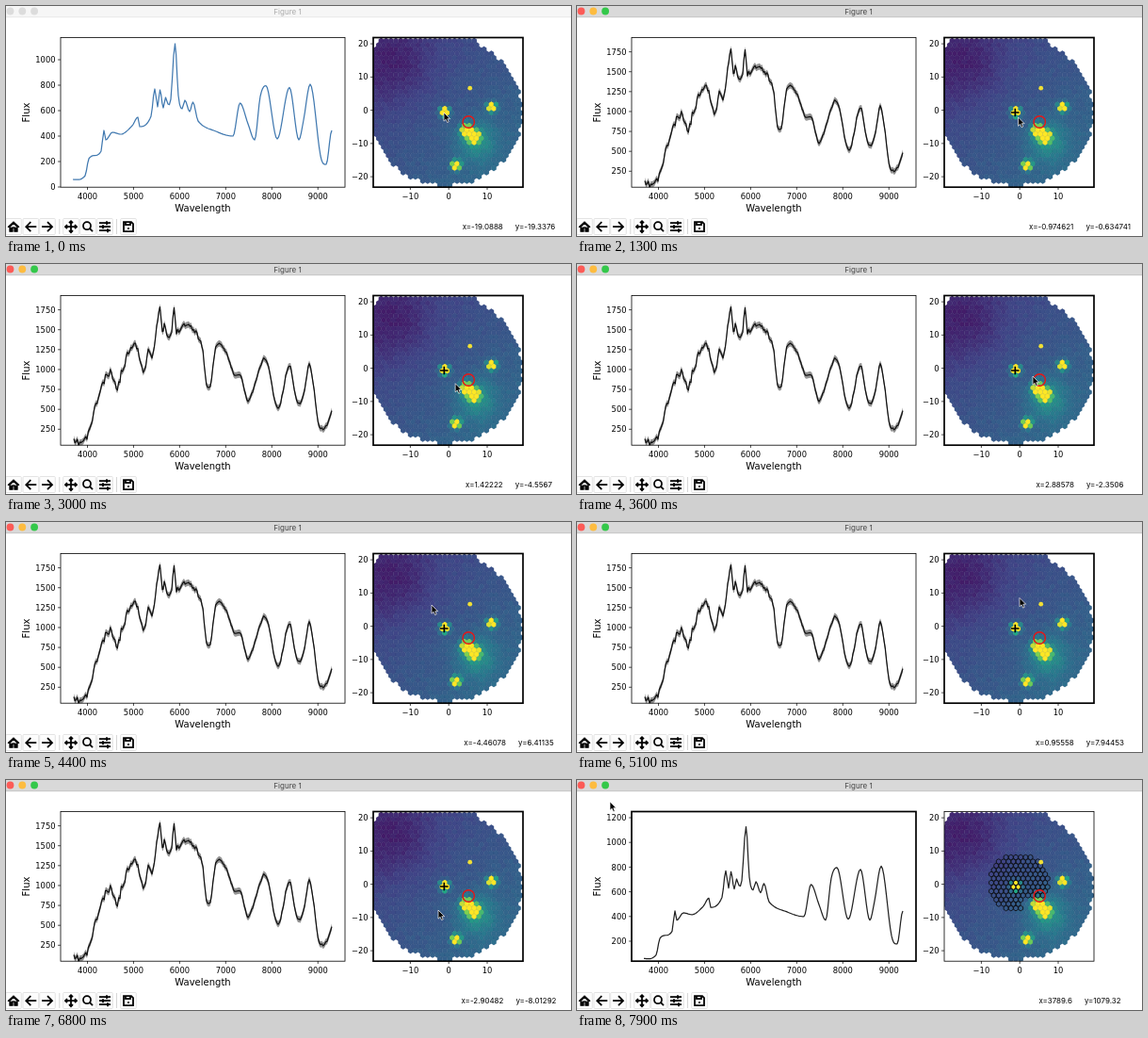
An HTML page that plays this animation: 600 by 244 pixels, repeating every 8 s.

```html
<!DOCTYPE html>
<html lang="en">
<head>
<meta charset="utf-8">
<title>Spectrum viewer</title>
<style>
html, body { margin: 0; width: 100%; height: 100%; overflow: hidden; background: #fff; }
svg { display: block; width: 600px; height: 244px; }
.tick { font: 8.33px "DejaVu Sans", sans-serif; }
.label { font: 10px "DejaVu Sans", sans-serif; text-anchor: middle; }
.ui { font: 8px Inter, sans-serif; text-anchor: middle; }
</style>
</head>
<body>
<svg id="stage" viewBox="0 0 600 244"></svg>
<script>
const stage = document.getElementById('stage');
const LOOP = 8000, STEP = 100;
const ACTIVATE = 500, PICK = 1000, GROUP = 7000, LEAVE = 7400;

function el(tag, attrs = {}, parent = stage, text) {
  const node = document.createElementNS('http://www.w3.org/2000/svg', tag);
  for (const k in attrs) node.setAttribute(k, attrs[k]);
  if (text !== undefined) node.textContent = text;
  parent.appendChild(node);
  return node;
}
const show = (node, on) => node.setAttribute('visibility', on ? 'visible' : 'hidden');
const pathOf = pts => 'M' + pts.map(p => p[0].toFixed(2) + ' ' + p[1].toFixed(2)).join('L');
const range = (from, to, step) =>
  Array.from({ length: Math.floor((to - from) / step) + 1 }, (_, i) => from + i * step);
const pairs = flat => range(0, flat.length - 2, 2).map(i => [flat[i], flat[i + 1]]);

let seed = 11;
function random() {
  seed = (seed * 16807) % 2147483647;
  return seed / 2147483647;
}

// Window frame
el('rect', { width: 600, height: 244, fill: '#fff' });
const bar = el('rect', { width: 600, height: 12 });
const barLine = el('rect', { y: 11.5, width: 600, height: 0.7 });
const lights = ['#fc5b57', '#fdbc40', '#34c84a'].map((color, i) =>
  ({ color, node: el('circle', { cx: 4.5 + 12.8 * i, cy: 5.5, r: 3.9 }) }));
const title = el('text', { class: 'ui', x: 299, y: 8.7 }, stage, 'Figure 1');

const defs = el('defs');
function clip(id, x, width) {
  el('rect', { x, y: 33.5, width, height: 158.7 }, el('clipPath', { id }, defs));
}
clip('leftClip', 58, 302);
clip('rightClip', 390, 159);

// Axes
function yTicks(values, toY, x, parent) {
  for (const v of values) {
    const y = toY(v);
    el('path', { d: `M${x} ${y}h-3`, stroke: '#000', 'stroke-width': 0.7 }, parent);
    el('text', { class: 'tick', x: x - 5.5, y: y + 3.1, 'text-anchor': 'end' }, parent, String(v).replace('-', '−'));
  }
}
function xTicks(values, toX) {
  for (const v of values) {
    const x = toX(v);
    el('path', { d: `M${x} 192v3`, stroke: '#000', 'stroke-width': 0.7 });
    el('text', { class: 'tick', x, y: 205, 'text-anchor': 'middle' }, stage, String(v).replace('-', '−'));
  }
}
xTicks(range(4000, 9000, 1000), v => 86.5 + (v - 4000) * 0.04895);
xTicks(range(-10, 10, 10), v => 470.2 + v * 4.08);
yTicks(range(-20, 20, 10), v => 110.6 - v * 3.525, 390, stage);
el('text', { class: 'label', x: 209, y: 217.5 }, stage, 'Wavelength');
el('text', { class: 'label', transform: 'translate(25 113) rotate(-90)' }, stage, 'Flux');

// Spectra as x, y turning points on the stage
const emission = pairs([71,184, 84,180, 88,162, 101,154, 104,132, 106,142, 113,134, 122,136,
  134,127, 140,118, 142,128, 154,117, 158,88, 161,107, 163.5,89, 167,108, 169.5,97, 172,104,
  175,99, 179.5,40, 183,95, 187,109, 190,100, 195,112, 198.5,102, 204,122, 223,133, 241,138,
  248.5,103, 257,125, 264,142, 270,96, 276,84.5, 288,141, 301,86.5, 311,142, 316,121,
  323,83, 334,159, 340,168, 346,132]);
const stellar = pairs([72,190, 86,184, 93,159, 103,127, 112,116, 117,131, 125,108, 135,84,
  140,92, 147,115, 151,90, 155,98, 160,66, 163.5,47, 166,74, 168,65, 172,78, 176,73,
  178.5,46, 181,72, 189,64, 208,86, 214,132, 217,129, 224,85, 234,94, 244,119, 248,117,
  257,145, 262,135, 275,100, 289,153, 301,108, 310,148, 316,139, 322,107, 334,175,
  341,171, 346,157]);

function smooth(points) {
  const out = [];
  for (let i = 0; i < points.length - 1; i++) {
    const [a, b, c, d] = [-1, 0, 1, 2].map(k => points[Math.min(points.length - 1, Math.max(0, i + k))]);
    const bend = (p, q, r) => (q[1] - p[1]) * (r[1] - q[1]) > 0 ? (r[1] - p[1]) / (r[0] - p[0]) : 0;
    const w = c[0] - b[0], m = bend(a, b, c) * w, n = bend(b, c, d) * w;
    const steps = Math.max(2, Math.round(w / 1.3));
    for (let k = 0; k < steps; k++) {
      const u = k / steps, s = u * u * (3 - 2 * u);
      out.push([b[0] + w * u, b[1] + (c[1] - b[1]) * s + u * (1 - u) * (m * (1 - u) - n * u)]);
    }
  }
  return [...out, points.at(-1)];
}

function chart(values, toY) {
  const g = el('g');
  yTicks(values, toY, 58, g);
  return { g, plot: el('g', { 'clip-path': 'url(#leftClip)' }, g) };
}
function line(parent, pts, color) {
  el('path', { d: pathOf(pts), fill: 'none', stroke: color, 'stroke-width': 1.25, 'stroke-linejoin': 'round' }, parent);
}
const fluxY = v => 192 - v * 0.135;
const groupY = v => 197.2 - v * 0.131;
const emissionLine = smooth(emission);
const before = chart(range(0, 1000, 200), fluxY);
line(before.plot, emissionLine, '#4179b0');

const picked = chart(range(250, 1750, 250), v => 196.4 - v * 0.08445);
const stellarLine = smooth(stellar).map(([x, y]) =>
  [x, y + (random() - 0.5) * (x < 140 ? 9 : x < 215 ? 5 : 3)]);
const band = [...stellarLine.map(([x, y]) => [x, y - 3.4]), ...stellarLine.map(([x, y]) => [x, y + 3.4]).reverse()];
el('path', { d: pathOf(band) + 'Z', fill: '#949494' }, picked.plot);
line(picked.plot, stellarLine, '#111');

const grouped = chart(range(200, 1200, 200), groupY);
line(grouped.plot, emissionLine.map(([x, y]) => [x, groupY((192 - y) / 0.135)]), '#222');

// Hexagon map
const viridis = ['440154', '414487', '2a788e', '22a884', '7ad151', 'fde725']
  .map(hex => hex.match(/../g).map(c => parseInt(c, 16)));
function color(v) {
  const s = Math.min(0.9999, Math.max(0, v)) * 5, i = Math.floor(s);
  return `rgb(${viridis[i].map((c, k) => Math.round(c + (viridis[i + 1][k] - c) * (s - i)))})`;
}
const blobs = [ // x, y, radius, strength
  [466, 112.5, 4.6, 1.3], [516, 107.5, 4.5, 1.2], [489, 132, 5.2, 1.3], [497, 139, 5.8, 1.5],
  [478, 169, 4.5, 1.3], [499, 143, 21, 0.2], [424, 124, 2.5, 0.08], [412, 64, 40, -0.1]];
const brightness = (x, y) => blobs.reduce(
  (sum, [bx, by, r, a]) => sum + a * Math.exp(-(((x - bx) / r) ** 2 + ((y - by) / r) ** 2)),
  0.265 + (x + y - 582) / 1500);

// Round field of view with a squarer top left corner
const inside = (x, y) => Math.hypot((x - 467) / 81, (y - 112) / 78.5) < 1 ||
  (x < 500 && y < 112 && x + y > 434);
function hexagon(x, y, r) {
  return pathOf(range(0, 5, 1).map(i => {
    const a = (i + 0.5) * Math.PI / 3;
    return [x + r * Math.cos(a), y + r * Math.sin(a)];
  })) + 'Z';
}
const map = el('g', { 'clip-path': 'url(#rightClip)' });
const cells = el('g', { stroke: '#203060', 'stroke-opacity': 0.16, 'stroke-width': 0.55 }, map);
const group = el('g', { fill: 'none', stroke: '#10131c', 'stroke-width': 0.95 }, map);
for (let row = 0; row < 36; row++) {
  for (let col = 0; col < 32; col++) {
    const x = 388 + (col + row % 2 / 2) * 5.2, y = 37 + row * 4.5;
    if (!inside(x, y)) continue;
    el('path', { d: hexagon(x, y, 3.15), fill: color(brightness(x, y) + (random() - 0.5) * 0.035) }, cells);
    if (Math.hypot(x - 469, y - 109) < 31.5 && !(x > 473 && y > 124)) {
      el('path', { d: hexagon(x, y, 2.8) }, group);
    }
  }
}
el('circle', { cx: 492.7, cy: 87.2, r: 2.4, fill: '#f0df35' }, map);
el('circle', { cx: 491.2, cy: 123, r: 6.2, fill: 'none', stroke: '#e81515', 'stroke-width': 1.4 }, map);
const cross = el('path', { d: 'M461 113h8.6M465.3 108.7v8.6', stroke: '#000', 'stroke-width': 1.6 }, map);

const frame = (x, width) => el('rect', { x, y: 33.5, width, height: 158.7, fill: 'none', stroke: '#000' });
const leftBox = frame(58, 302), rightBox = frame(390, 159);

// Toolbar
const arrow = 'M6 0H-5M0-5L-5 0L0 5';
const icons = [
  [8, 'M-6 .5L0-5L6 .5M-4 0V5H-1V1H1V5H4V0L0-4Z'],
  [26.3, arrow],
  [44, arrow, 'scale(-1 1)'],
  [69, 'M-6 0H6M0-6V6M-4-2L-6 0L-4 2M4-2L6 0L4 2M-2-4L0-6L2-4M-2 4L0 6L2 4'],
  [87, 'M3-1A4 4 0 1 1-5-1A4 4 0 1 1 3-1M2 2L5 5'],
  [105, 'M-6-4H6M-6 0H6M-6 4H6M2-6V-2M-2-2V2M3 2V6'],
  [130, 'M-5-5H3L5-3V5H-5ZM-3-5V-2H2V-5M-1 2H1']];
for (const [x, d, flip = ''] of icons) {
  el('rect', { x: x - 8.3, y: 225.5, width: 16.6, height: 17, rx: 1, fill: '#fdfdfd', stroke: '#dcdcdc', 'stroke-width': 0.8 });
  el('path', {
    d, transform: `translate(${x} 234.2) ${flip}`,
    fill: x === 8 ? '#000' : 'none', stroke: '#000', 'stroke-width': x === 8 ? 1.3 : 1.8
  });
}
el('path', { d: 'M56.8 226v16M117.5 226v16', stroke: '#ccc', 'stroke-width': 0.8 });

const readout = el('text', { class: 'ui', x: 534, y: 236.5 });
const readX = el('tspan', {}, readout), readY = el('tspan', { dx: 13 }, readout);
const pointer = el('path', {
  d: 'M0 0V9.2L2.1 7.3L3.6 10.6L5.2 9.9L3.8 6.7H6.6Z',
  fill: '#000', stroke: '#fff', 'stroke-width': 0.7
});

// Motion: [time, x, y]
const pointerKeys = [[0, 465, 113], [1000, 466, 113], [1300, 468.5, 118], [2200, 468, 137],
  [3600, 484, 119], [4400, 452, 88], [5100, 470, 80.5], [6800, 459, 138], [7200, 459, 136],
  [7400, 345, 128], [7800, 76, 55], [7900, 35, 23]];
const idle = [-19.0888, -19.3376], clicked = [-0.974621, -0.634741], last = [-2.90482, -8.01292];
const readoutKeys = [[0, ...idle], [900, ...idle], [1000, ...clicked], [1300, ...clicked],
  [2200, -0.52919, -7.49816], [3600, 2.88578, -2.3506], [4400, -4.46078, 6.41135],
  [5100, 0.95558, 7.94453], [6800, ...last], [7300, ...last],
  [7400, 9280.9, 528.24], [7800, 3789.6, 1079.32]];
function track(keys, t) {
  const i = keys.findIndex(k => k[0] > t);
  if (i < 0) return keys.at(-1).slice(1);
  const [a, b] = [keys[i - 1], keys[i]], u = (t - a[0]) / (b[0] - a[0]);
  return [1, 2].map(n => a[n] + (b[n] - a[n]) * u);
}
const format = v => String(Number(v.toPrecision(6)));

function render(t) {
  const active = t >= ACTIVATE;
  bar.setAttribute('fill', active ? '#d9d9d9' : '#f6f6f6');
  barLine.setAttribute('fill', active ? '#bcbcbc' : '#e2e2e2');
  title.setAttribute('fill', active ? '#444' : '#aaa');
  for (const { node, color } of lights) node.setAttribute('fill', active ? color : '#dcdcdc');

  show(before.g, t < PICK);
  show(picked.g, t >= PICK && t < GROUP);
  show(grouped.g, t >= GROUP);
  show(cross, t >= PICK && t < GROUP);
  show(group, t >= GROUP);
  leftBox.setAttribute('stroke-width', t >= LEAVE ? 1.7 : 0.8);
  rightBox.setAttribute('stroke-width', t >= LEAVE ? 0.8 : 1.7);

  const [x, y] = track(readoutKeys, t);
  readX.textContent = 'x=' + format(x);
  readY.textContent = 'y=' + format(y);
  pointer.setAttribute('transform', `translate(${track(pointerKeys, t)})`);
}

const start = performance.now();
function tick() {
  const elapsed = (performance.now() - start) % LOOP;
  render(Math.floor(elapsed / STEP) * STEP);
  requestAnimationFrame(tick);
}
tick();
</script>
</body>
</html>
```
